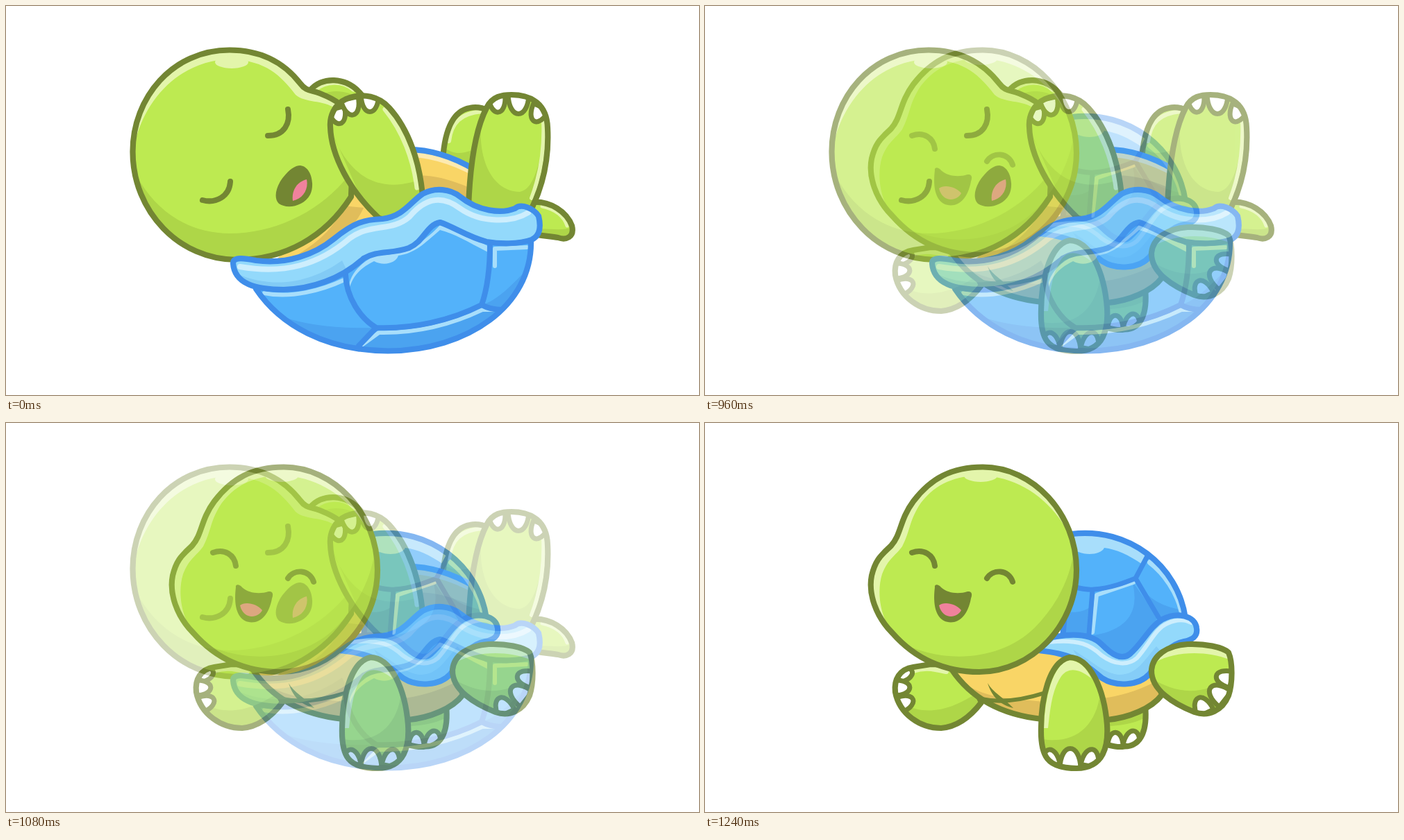
These frames come from a looping animation (998x561 px, 2 s). An HTML page:

```html
<!DOCTYPE html>
<html lang="en">
<head>
<meta charset="utf-8">
<title>Turtle</title>
<style>
  html, body { margin: 0; width: 100%; height: 100%; overflow: hidden; background: #fff; }
  svg { display: block; width: 998px; height: 561px; }
</style>
</head>
<body>
<svg id="stage" viewBox="0 0 998 561" fill="none" stroke-linecap="round" stroke-linejoin="round"></svg>
<script>
const OLIVE = '#738633', GREEN = '#bdea51', LEAF = '#aed648', PALE = '#e3f5ab';
const EDGE = '#3f8eea', BLUE = '#53b2fa', DEEP = '#4ba3f0', SKY = '#93d9fb', MIST = '#a8defb', ICE = '#cdeefd';
const SAND = '#f9d566', TAN = '#e0bd5b', CREAM = '#fdeab0', PINK = '#f0829c';

let clips = 0;
const fill = (d, color) => `<path d="${d}" fill="${color}"/>`;
const line = (d, color, width = 8) => `<path d="${d}" stroke="${color}" stroke-width="${width}"/>`;
const spot = (x, y, rx, ry, color) => `<ellipse cx="${x}" cy="${y}" rx="${rx}" ry="${ry}" fill="${color}"/>`;

// A filled outline whose details are clipped to its inside.
function shape(d, color, edge, details = '') {
  const id = 'c' + clips++;
  return `<clipPath id="${id}"><path d="${d}"/></clipPath>` + fill(d, color) +
    `<g clip-path="url(#${id})">${details}</g>` + line(d, edge, 8.2);
}

// Each claw is [x, y, turn, scale]; its base sits on the edge of the foot.
const claws = list => list.map(([x, y, turn, scale]) =>
  `<path d="M-15 2C-14 -36 14 -36 15 2Z" fill="#fff" stroke="${OLIVE}" stroke-width="7"
    vector-effect="non-scaling-stroke" transform="translate(${x} ${y}) rotate(${turn}) scale(${scale})"/>`).join('');

function sleeping() {
  const tail = shape('M755 283C785 280 808 298 815 317C819 334 806 338 795 334C784 332 775 332 760 329Z', GREEN, OLIVE,
    fill('M760 322C785 320 800 326 818 318L810 342H760Z', LEAF) +
    line('M772 289C792 293 804 304 808 317', PALE, 5));

  const backLeg = shape('M629 222C632 175 645 151 668 147C678 145 687 147 695 151L680 260Z', GREEN, OLIVE,
    fill('M632 205C648 216 660 214 690 200V260H630Z', LEAF) +
    line('M638 195C641 168 655 155 685 152', PALE, 6));

  const backArm = shape('M438 122C453 102 490 100 513 129L500 165L450 140Z', GREEN, OLIVE,
    fill('M455 127C475 119 493 124 508 132L500 165Z', LEAF) +
    line('M446 121C460 109 484 107 500 121', PALE, 5));

  const belly = fill('M380 375L490 265L570 207C610 205 645 218 675 236L690 300L480 350Z', SAND) +
    fill('M390 375C450 345 475 318 485 288L515 291C502 320 480 335 440 365Z', TAN) +
    fill('M590 244C620 244 645 251 690 272V300H590Z', TAN) +
    line('M570 214C608 213 642 224 675 242', CREAM, 7) +
    line('M570 207C610 205 645 218 675 236', EDGE, 8.2);

  const head = shape('M424 112C400 81 368 63.500 322 63.500C240 63.500 182.500 132 182.500 210C182.500 297 250 366 332 366C402 366 460 333 497 275L500 200L480 141C472 134 462 130 452 126C440 121 432 123 424 112Z', PALE, OLIVE,
    fill('M186 196C203 125 260 76 325 77C375 79 395 100 417 128C430 140 456 135 475 148L520 200L490 380H170Z', GREEN) +
    spot(325, 81, 24, 9, PALE) +
    fill('M182 233C210 293 260 328 322 328C392 328 460 292 498 238V380H180Z', LEAF)) +
    line('M406 149C410 169 401 187 377 187', OLIVE) +
    line('M283 280C302 285 322 275 323 253', OLIVE) +
    fill('M424 230C440 232 445 258 438 272C428 290 404 293 393 285C384 276 390 258 400 246C408 236 416 230 424 230Z', OLIVE) +
    fill('M433 250C418 254 411 267 413 281C428 278 436 264 433 250Z', PINK);

  const leg = shape('M666 290C668 235 675 180 692 147C700 130 715 128 728 128C757 128 779 142 780 176C782 215 775 255 757 292L715 305Z', GREEN, OLIVE,
    fill('M686 155C676 215 698 268 740 268C762 264 770 220 776 180L790 310H650Z', LEAF) +
    line('M774 166C776 210 769 245 757 277', PALE, 6) +
    claws([[707, 132, 175, .8], [738, 129, 180, 1], [770, 147, 205, .8]]));

  const arm = shape('M467 174C466 160 472 142 490 134C515 124 538 131 552 147C580 178 596 225 600 275L570 315L537 306C495 267 468 215 467 174Z', GREEN, OLIVE,
    fill('M468 178C492 245 535 270 592 252L605 320H530Z', LEAF) +
    line('M546 149C572 181 587 222 592 262', PALE, 7) +
    claws([[476, 149, 165, .8], [495, 135, 167, .85], [524, 130, 180, .85]]));

  const shell = shape('M360 408C395 460 460 497 550 497.500C665 497 757 432 756 340L625 310L500 360Z', BLUE, EDGE,
    fill('M355 425C395 455 450 466 533 464C600 467 650 455 685 431C710 425 735 395 760 370V520H350Z', DEEP) +
    line('M372 414C410 422 455 410 487 395', MIST, 6) +
    line('M508 492L537 471C590 472 640 460 686 438L704 438', MIST, 6) +
    line('M704 375V350L750 348', MIST, 6) +
    fill('M494 410C492 390 510 370 532 360C570 360 598 345 625 316C650 322 680 338 697 348L694 355C665 340 645 328 625 323C602 343 588 357 565 360C562 370 545 376 530 368C510 378 498 390 494 410Z', MIST) +
    line('M489 387C490 420 510 450 533 464C585 466 640 454 685 431C694 405 697 375 697 343M533 464L508 490M685 431C694 436 703 438 714 438', EDGE));

  const rim = shape('M327 371C327 361 345 364 360 367C405 373 445 358 472 336C500 313 515 308 542 307C573 303 583 282 600 271C618 261 640 264 654 275C680 296 713 300 733 292C742 284 760 292 767 303C771 320 768 332 757 337C738 344 710 343 692 340C665 333 646 319 625 312C605 316 603 339 580 349C555 358 535 352 515 364C482 394 440 408 400 409C360 409 329 401 327 371Z', SKY, EDGE,
    fill('M330 385C390 412 445 395 484 367L495 390L400 415L330 410Z', '#82cbf5') +
    line('M337 376C400 387 450 374 495 335C525 313 556 326 581 304C606 274 630 274 654 292C685 314 730 312 752 298', ICE));

  return tail + backLeg + backArm + belly + head + leg + arm + shell + rim;
}

function awake() {
  const backFoot = shape('M575 415L634 408C637 440 630 466 604 466.500C595 468 587 466 575 463Z', GREEN, OLIVE,
    fill('M575 410L634 408V425C615 435 595 436 575 438Z', LEAF) +
    claws([[591, 466, 0, .75], [614, 465, 10, .8]]));

  const farArm = shape('M300 352C280 355 272 370 274 388C280 420 310 440 340 440C365 438 385 420 398 403L375 350L325 348Z', GREEN, OLIVE,
    fill('M285 405C315 421 350 418 395 387L400 450H290Z', LEAF) +
    line('M300 357C315 352 325 353 347 358', PALE) +
    claws([[279, 363, 78, .75], [275, 382, 88, .75], [281, 406, 68, .75]]));

  const belly = shape('M355 355C385 400 430 421 485 427L580 428C610 425 643 412 658 392L640 340L500 310Z', SAND, OLIVE,
    fill('M370 374C410 400 445 397 488 402L580 396C605 392 630 383 655 370V440H400Z', TAN) +
    line('M398 398C430 405 462 398 490 389', OLIVE, 6) +
    fill('M407 375C414 388 430 396 444 411C428 407 414 398 407 375Z', OLIVE));

  const dome = shape('M528 160C610 150 681 205 692 282L610 345L515 310Z', BLUE, EDGE,
    fill('M615 228C628 275 605 300 555 307L615 345L652 280Z', DEEP) +
    fill('M520 272C535 274 545 272 554 266L551 305H515Z', DEEP) +
    fill('M622 224C632 250 655 265 690 270V283H655Z', DEEP) +
    fill('M530 160C575 158 610 173 637 193L630 204C610 190 592 182 575 180C570 190 550 191 538 186L530 184Z', MIST) +
    line('M641 201C662 217 680 244 686 270', MIST) +
    line('M558 302L564 248L617 230', MIST, 6) +
    line('M530 236C545 240 552 241 560 240C585 238 605 230 620 224L637 192M620 224L653 280M558 241L553 304', EDGE, 7));

  const rim = shape('M500 309C540 301 560 308 571 319C586 334 600 343 612 333C630 318 640 294 659 283C680 272 706 278 708 296C710 309 700 313 690 315C665 320 655 342 640 362C625 379 592 381 572 368C550 350 535 333 480 328Z', SKY, EDGE,
    fill('M530 327C560 345 575 362 598 363C622 362 632 343 650 322L665 340L610 390H570Z', '#85cdf7') +
    line('M495 316C540 311 556 321 571 335C590 349 609 350 622 339C640 319 649 296 666 289C681 282 693 284 700 288', ICE, 6));

  const leg = shape('M643 356C645 335 665 321 695 319C720 318 745 323 754 331C760 345 760 375 754 393C745 415 725 424 705 417C675 405 642 385 643 356Z', GREEN, OLIVE,
    fill('M640 366C675 390 715 396 760 365V430H670Z', LEAF) +
    fill('M650 344C665 320 710 314 755 330V341C720 327 675 330 650 344Z', PALE) +
    claws([[757, 370, 285, .8], [748, 397, 308, .95], [720, 417, 335, .85]]));

  const arm = shape('M484 440C484 400 495 344 525 338C555 338 575 385 579 435C581 465 575 497.500 535 498C492 498 483 480 484 440Z', GREEN, OLIVE,
    fill('M486 456C535 464 567 435 570 380L590 500H480Z', LEAF) +
    fill('M488 440C489 400 500 347 525 342C540 343 550 354 556 368C535 351 520 354 512 367C499 387 497 415 494 440Z', PALE) +
    claws([[499, 492, -10, .8], [526, 496, 0, 1], [554, 493, 10, .85]]));

  const head = shape('M400 63.500C472 63.500 535 130 535 212C535 292 470 359 395 359C340 359 300 337 270 303C245 278 235 245 240 220C246 195 255 190 268 177C283 160 280 140 300 113C325 80 355 63.500 400 63.500Z', PALE, OLIVE,
    fill('M270 304C250 275 248 240 255 218C264 195 274 192 284 178C296 155 294 140 311 115C334 85 365 75 400 76C455 78 510 116 532 180L545 370H300Z', GREEN) +
    spot(397, 76, 24, 9, PALE) +
    fill('M273 312C340 350 425 344 475 295C507 262 526 225 532 180L550 370H280Z', LEAF)) +
    line('M298 187C315 181 329 190 331 206', OLIVE) +
    line('M406 224C415 210 437 211 443 229', OLIVE) +
    fill('M331 237C330 232 336 232 340 237C350 246 366 247 378 243C385 242 385 248 383 253C379 275 368 287.500 354 287.500C336 287 327 270 331 237Z', OLIVE) +
    fill('M337 263C344 257 361 260 369 270C363 282 342 284 337 263Z', PINK);

  return backFoot + farArm + belly + dome + rim + leg + arm + head;
}

const stage = document.getElementById('stage');
stage.innerHTML = sleeping() +
  `<g id="awake"><rect width="998" height="561" fill="#fff"/>${awake()}</g>`;
const layer = document.getElementById('awake');

// Cross-fade in eleven equal steps of 40 ms, then cut back at the loop end.
const start = performance.now();
function draw() {
  const time = (performance.now() - start) % 2000;
  const step = Math.floor((time - 840) / 40) + 1;
  layer.setAttribute('opacity', Math.min(1, Math.max(0, step / 11)));
  requestAnimationFrame(draw);
}
draw();
</script>
</body>
</html>
```
